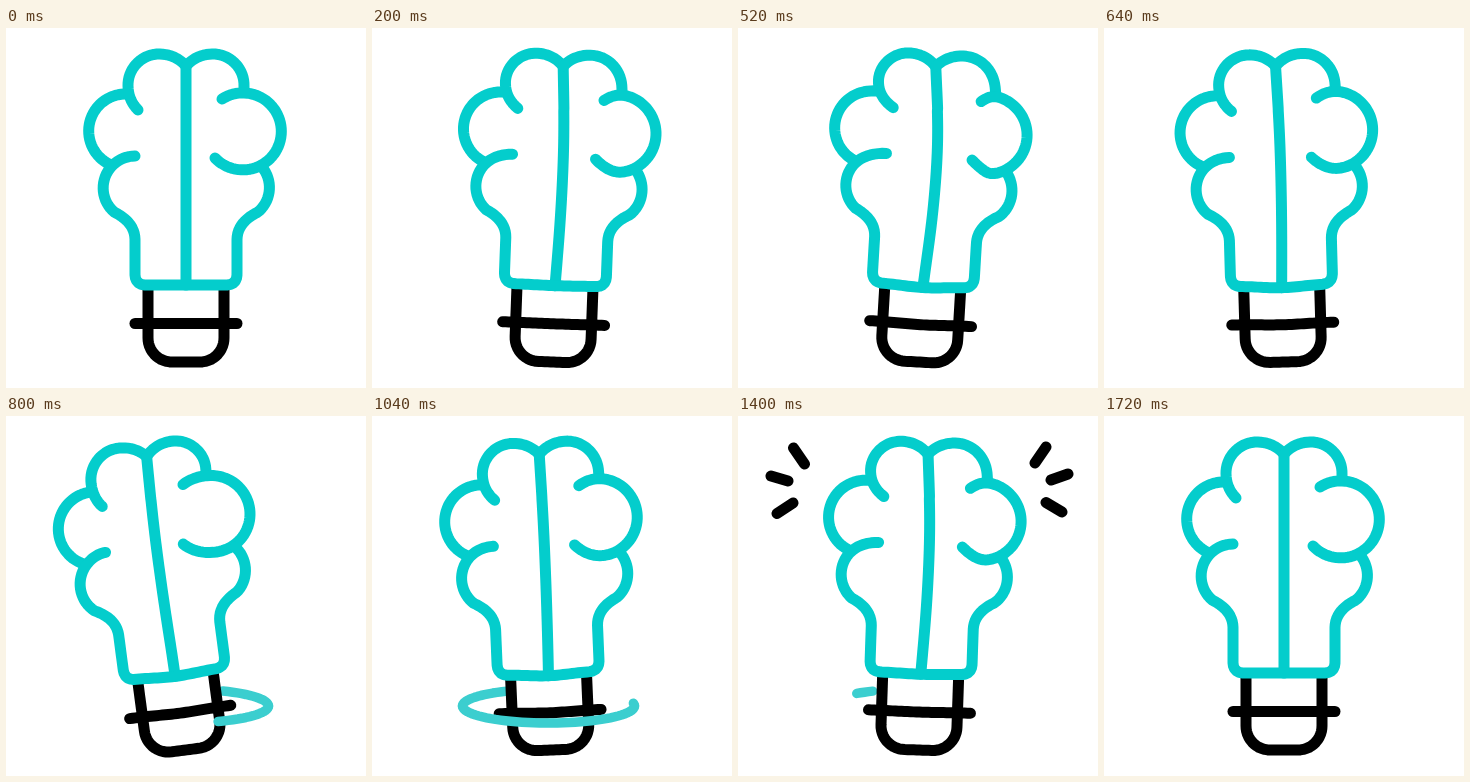
Animation, 360 px wide and 360 px high, one loop 2160 ms. Source, as an HTML page:

```html
<!DOCTYPE html>
<html lang="en">
<head>
<meta charset="utf-8">
<title>Swaying idea bulb</title>
<style>
  html, body { margin: 0; width: 100%; height: 100%; overflow: hidden; background: #fff; }
  svg { display: block; width: 100%; height: 100%; }
  path { fill: none; stroke-width: 11; stroke-linecap: round; stroke-linejoin: round; }
  .ink { stroke: #000; }
  .teal { stroke: #04cdcc; }
  .ring { stroke: #3bcecf; stroke-width: 9.5; }
</style>
</head>
<body>
<svg viewBox="0 0 360 360">
  <path id="ringBack" class="ring"/>
  <path class="ink bend" d="M142,262 V310 A24,24 0 0 0 166,334 H194 A24,24 0 0 0 218,310 V262"/>
  <path class="ink bend" d="M129,295.5 H231"/>
  <path id="ringFront" class="ring"/>
  <path class="teal bend" d="M180,38 V257"/>
  <path class="teal bend" d="M180,38 C172,29 162,26 153,26 C136,26 122,40 122,57 C122,68 126,76 132,82"/>
  <path class="teal bend" d="M180,38 C188,29 198,26 207,26 C224,26 238,40 238,57 V64"/>
  <path class="teal bend" d="M121,66 A37,37 0 0 0 103,136"/>
  <path class="teal bend" d="M209,130 A38.5,38.5 0 1 0 216,71"/>
  <path class="teal bend" d="M129,128 A32,32 0 0 0 108,184 C122,191 129,200 129,212 V246 Q129,257 140,257
    H220 Q231,257 231,246 V212 C231,200 238,191 252,184 A32,32 0 0 0 256,139"/>
  <path id="rays" class="ink"/>
</svg>
<script>
const LOOP = 2160, STEP = 40;
const AXIS = 180, FLOOR = 340, HEIGHT = 302;
const SPINE_END = 257, SPINE_LENGTH = 219;

// Keys are [time, value] pairs, in ms and px.
const LEAN = [[0, 0], [430, 25], [850, -42], [1220, 14], [1720, 0]];
const SWAY = [[0, 0], [430, 9], [820, -2.5], [1280, 6], [1720, 0]];
const SAG = [[0, 0], [640, 3.5], [1040, 3.5], [1720, 0]];

// Each ray runs outward: inner x, y, then outer x, y.
const RAYS = [
  [66.5, 48, 55.5, 32], [50, 65, 33, 60], [55, 87, 39, 97.5],
  [297, 47, 308, 31], [313, 64, 330, 58], [308, 86.5, 324, 96]
];

const $ = id => document.getElementById(id);
const progress = (t, from, to) => Math.min(1, Math.max(0, (t - from) / (to - from)));
const bell = (v, center, width) => Math.exp(-(((v - center) / width) ** 2));
const toPath = points => points.length
  ? 'M' + points.map(p => p.map(n => n.toFixed(2)).join()).join('L') : '';

function keyed(keys, t) {
  const i = keys.findIndex(k => k[0] > t);
  if (i < 0) return keys[keys.length - 1][1];
  const [t0, a] = keys[i - 1], [t1, b] = keys[i];
  return a + (b - a) * (1 - Math.cos(Math.PI * progress(t, t0, t1))) / 2;
}

function sample(path) {
  const length = path.getTotalLength(), count = Math.ceil(length / 3);
  return Array.from({ length: count + 1 }, (_, i) => {
    const { x, y } = path.getPointAtLength(length * i / count);
    return [x, y];
  });
}

const shapes = [...document.querySelectorAll('.bend')].map(path => ({ path, points: sample(path) }));

// Tilts the outline rigidly; the spine and the inner curls swing further than the outline.
function warp([x, y], { angle, sway, sag }) {
  const side = x - AXIS, rise = FLOOR - y;
  const spine = Math.max(0, Math.sin(Math.PI * (SPINE_END - y) / SPINE_LENGTH)) * bell(side, 0, 15);
  const curl = (side > 0 ? 2.7 : 1.7) * bell(Math.abs(side), 38, 22) * bell(y, 105, 45);
  const dip = bell(side, 0, 30) * bell(y, 270, 25);
  return [
    AXIS + side * Math.cos(angle) + rise * Math.sin(angle) + sway * (0.85 * spine + curl),
    FLOOR - rise * Math.cos(angle) + side * Math.sin(angle) + sag * dip
  ];
}

function arc(from, to) {
  if (to <= from) return '';
  const count = Math.ceil((to - from) / 4);
  return toPath(Array.from({ length: count + 1 }, (_, i) => {
    const a = (from + (to - from) * i / count) * Math.PI / 180;
    return [176.5 + 86 * Math.cos(a), 290 + 17 * Math.sin(a)];
  }));
}

function drawRing(t) {
  const tail = -62 + 303 * progress(t, 960, 1420);
  const head = -62 + 303 * progress(t, 680, 965);
  const front = arc(Math.max(tail, 0), Math.min(head, 180));
  const back = arc(tail, Math.min(head, 0)) + arc(Math.max(tail, 180), head);
  $('ringFront').setAttribute('d', front);
  $('ringBack').setAttribute('d', back);
}

function drawRays(t) {
  const head = 1.25 * progress(t, 1240, 1440), tail = 1.25 * progress(t, 1440, 1640);
  $('rays').setAttribute('d', head <= tail ? '' : RAYS.map(([x, y, x2, y2]) =>
    toPath([tail, head].map(p => [x + (x2 - x) * p, y + (y2 - y) * p]))).join(''));
}

function draw(now) {
  const t = Math.floor(now % LOOP / STEP) * STEP;
  const pose = {
    angle: Math.atan(keyed(LEAN, t) / HEIGHT),
    sway: keyed(SWAY, t),
    sag: keyed(SAG, t)
  };
  for (const { path, points } of shapes) {
    path.setAttribute('d', toPath(points.map(p => warp(p, pose))));
  }
  drawRing(t);
  drawRays(t);
  requestAnimationFrame(draw);
}
requestAnimationFrame(draw);
</script>
</body>
</html>
```
